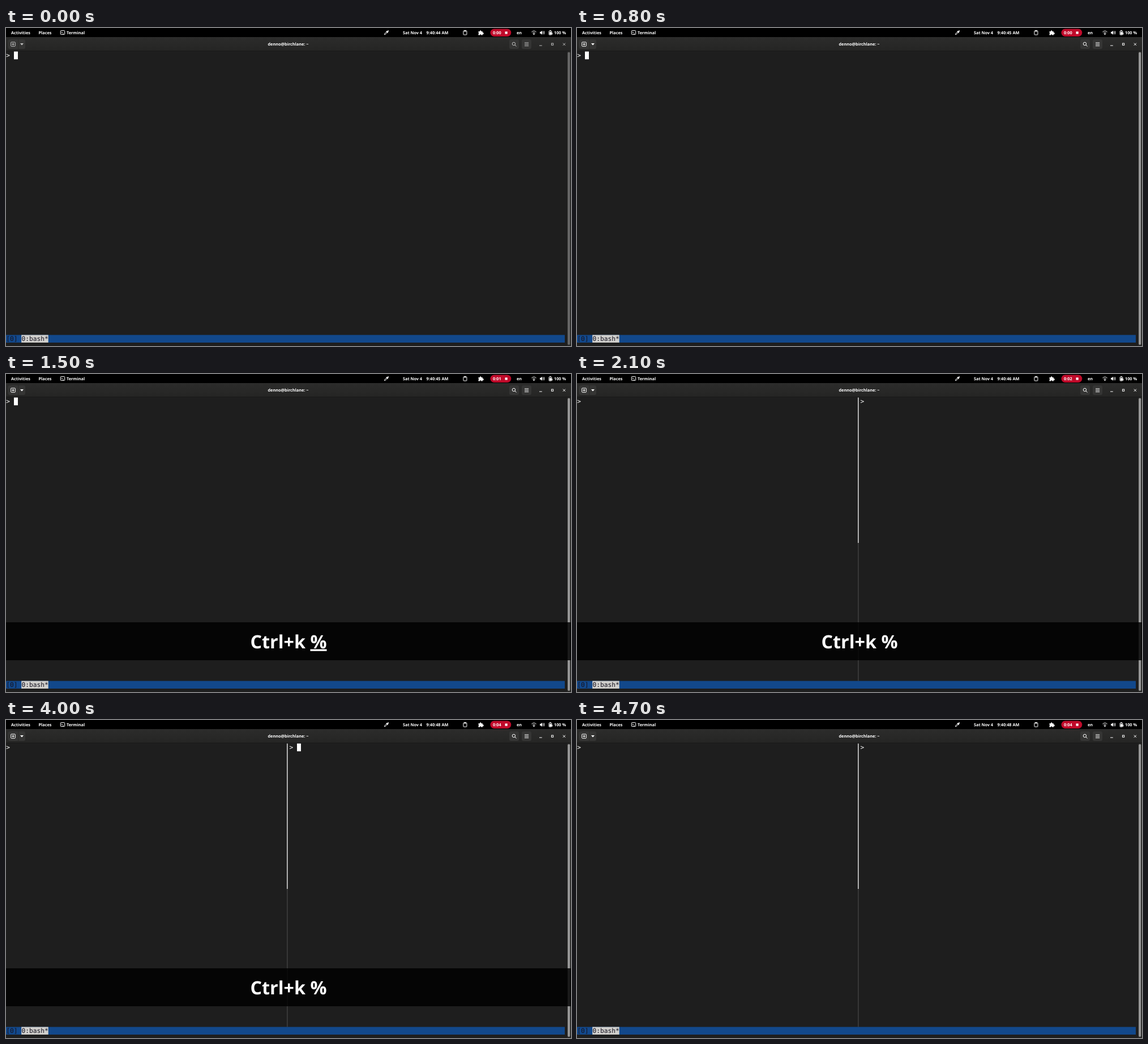
Write an HTML page that moves like this. It is 998 px wide and 561 px high and loops after 4800 ms.

```html
<!DOCTYPE html>
<html lang="en">
<head>
<meta charset="utf-8">
<title>Terminal split</title>
<style>
  html, body { margin: 0; height: 100%; overflow: hidden; background: #1e1e1e; }
  svg { display: block; width: 998px; height: 561px; }
  text { fill: #fff; white-space: pre; text-rendering: geometricPrecision; }
  .ui { font: 600 7.3px "Noto Sans", sans-serif; }
  .mono { font: 11.23px "DejaVu Sans Mono", monospace; }
  .keys { font: 700 32.3px "Noto Sans", sans-serif; text-anchor: middle; }
  .recent { text-decoration: underline; }
  .line { fill: none; stroke: #fff; stroke-width: 1; }
  .fill { fill: #fff; }
</style>
</head>
<body>
<svg viewBox="0 0 998 561">
  <defs>
    <linearGradient id="bar" x2="0" y2="1">
      <stop stop-color="#2c2c2b"/><stop offset="1" stop-color="#252524"/>
    </linearGradient>
  </defs>
  <rect width="998" height="561" fill="#1e1e1e"/>

  <!-- Top panel -->
  <rect width="998" height="16" fill="#000"/>
  <g class="ui">
    <text x="9" y="10.7">Activities</text>
    <text x="57.5" y="10.7">Places</text>
    <text x="107" y="10.7">Terminal</text>
    <text x="701" y="10.7">Sat Nov 4</text>
    <text x="742.5" y="10.7" id="clock"></text>
    <text x="902" y="10.7">en</text>
    <text x="968" y="10.7">100 %</text>
  </g>
  <rect class="line" x="96.3" y="4.5" width="7.4" height="7" rx="1"/>
  <path class="line" stroke-width=".8" d="M98 6.5l1.5 1.5-1.5 1.5M100.3 10h1.8"/>
  <path class="line" d="M668.5 11.7l.5-2 3-3 1.3 1.3-3 3z"/>
  <path class="fill" d="M671.3 6l1-1 .8.8 1.2-1.3q1-.6 1.5.1.6.7 0 1.4L674.500 7.200l.7.7-1 1z"/>
  <rect class="line" x="807.9" y="5" width="6" height="7" rx=".8"/>
  <rect class="fill" x="809.2" y="4" width="3.4" height="2.3" rx=".5"/>
  <path class="fill" d="M834.500 6h2.300a1.400 1.400 0 1 1 2.700 0h2.300v2.300a1.400 1.400 0 1 1 0 2.600V12.500h-2.300a1.300 1.300 0 0 0-2.600 0h-2.400v-2.200a1.400 1.400 0 0 0 0-2.400z"/>
  <rect x="855.5" y="1.500" width="36.800" height="13.500" rx="6.750" fill="#c00a2a"/>
  <text class="ui" x="860" y="10.700" id="recorder"></text>
  <rect class="fill" x="881.500" y="6.300" width="4.200" height="4.200"/>
  <path class="line" d="M928.500 7q4-3.600 8 0M930.200 9q2.300-2 4.600 0"/>
  <circle class="fill" cx="932.500" cy="10.800" r="1.200"/>
  <path class="fill" d="M943 6.700h1.800l2.400-2.200v7.500l-2.400-2.200H943z"/>
  <path class="line" d="M948.500 6.500q1.300 1.700 0 3.400M949.900 5q2.300 3.200 0 6.400"/>
  <rect class="line" x="959" y="5.300" width="4.800" height="6.700" rx=".8"/>
  <path class="fill" d="M960.500 4h2v1h-2zM960 7h3v4.500h-3zM964.500 7l-1.500 3h1.200v2.500l1.800-3h-1.300z"/>

  <!-- Window header -->
  <rect y="16" width="998" height="25" fill="url(#bar)"/>
  <rect y="40" width="998" height="1" fill="#181818"/>
  <g fill="#353534">
    <rect x="3.500" y="20" width="30.500" height="17" rx="3"/>
    <rect x="889" y="20" width="17" height="17" rx="3"/>
    <rect x="911" y="20" width="17" height="17" rx="3"/>
  </g>
  <path d="M21.700 20v17" stroke="#292928"/>
  <text class="ui" x="498.500" y="31.200" text-anchor="middle">denno@birchlane: ~</text>
  <g id="controls">
    <rect class="line" x="8.700" y="24.900" width="7.600" height="7.400" rx="1"/>
    <path class="line" d="M10.300 28.600h4.400M12.500 26.400v4.400"/>
    <path class="fill" d="M25 27h6l-3 3.400z"/>
    <circle class="line" cx="896.900" cy="27.900" r="2.700"/>
    <path class="line" d="M899 30l2.500 2.500"/>
    <path class="line" d="M916 26h7.200M916 28.700h7.200M916 31.400h7.200"/>
    <path class="line" d="M942 31h4.800"/>
    <rect class="line" x="963.500" y="27" width="3.200" height="3.200"/>
    <path class="line" d="M983.800 26.600l4.200 4.200m0-4.200l-4.200 4.200"/>
  </g>

  <!-- Terminal -->
  <rect x="991" y="41" width="7" height="520" fill="#272726"/>
  <rect x="992.200" y="42.500" width="4" height="516.500" rx="2" id="scrollbar"/>
  <g class="mono">
    <text x="0.300" y="52">&gt;</text>
    <g id="split">
      <rect x="496.400" y="298" width="1" height="243.500" fill="#505050"/>
      <rect class="fill" x="496.200" y="41.500" width="1.300" height="256.500"/>
      <text x="500.400" y="52">&gt;</text>
    </g>
    <rect class="fill" y="41.500" width="7" height="13.700" id="cursor"/>
    <rect y="541.500" width="987" height="13.500" fill="#12488b"/>
    <rect x="27.200" y="541.500" width="47.500" height="13.500" fill="#d0cfcc"/>
    <text x="0.300" y="551.800" style="fill:#171421">[0]</text>
    <text x="27.400" y="551.800" style="fill:#171421">0:bash*</text>
  </g>

  <!-- Pressed keys -->
  <g id="overlay">
    <rect y="438" width="998" height="67" fill="#000" fill-opacity=".82"/>
    <text class="keys" x="499" y="483.500"><tspan id="chord">Ctrl+k</tspan><tspan id="gap"> </tspan><tspan id="percent">%</tspan></text>
  </g>
</svg>
<script>
const LOOP = 4800;
const SHOW = 900, PERCENT = 1500, SPLIT = 1600, HIDE = 4200;
const RECENT = 200, BLINK = 600;
const clockTicks = [700, 1700, 2600, 3600];
const recorderTicks = [1100, 2000, 2900, 3900];

const $ = id => document.getElementById(id);
const count = (ticks, t) => ticks.filter(tick => t >= tick).length;
const show = (id, on) => $(id).setAttribute('visibility', on ? 'visible' : 'hidden');
const setText = (id, value) => {
  if ($(id).textContent !== value) $(id).textContent = value;
};
const underline = (id, t, start) =>
  $(id).classList.toggle('recent', t >= start && t < start + RECENT);

function render(t) {
  setText('clock', `9:40:${44 + count(clockTicks, t)} AM`);
  setText('recorder', `0:0${count(recorderTicks, t)}`);

  // The window gains focus in three short steps.
  const focus = Math.min(3, Math.floor(t / 100)) / 3;
  const grey = 105 + 50 * focus;
  $('controls').setAttribute('opacity', 0.7 + 0.3 * focus);
  $('scrollbar').setAttribute('fill', `rgb(${grey},${grey},${grey})`);

  const split = t >= SPLIT;
  show('split', split);
  $('cursor').setAttribute('x', split ? 514 : 14);
  show('cursor', !split || Math.floor((t - PERCENT) / BLINK) % 2 === 0);

  show('overlay', t >= SHOW && t < HIDE);
  setText('gap', t >= PERCENT ? ' ' : '');
  setText('percent', t >= PERCENT ? '%' : '');
  underline('chord', t, SHOW);
  underline('percent', t, PERCENT);
}

const start = performance.now();
function frame() {
  render((performance.now() - start) % LOOP);
  requestAnimationFrame(frame);
}
frame();
</script>
</body>
</html>
```
